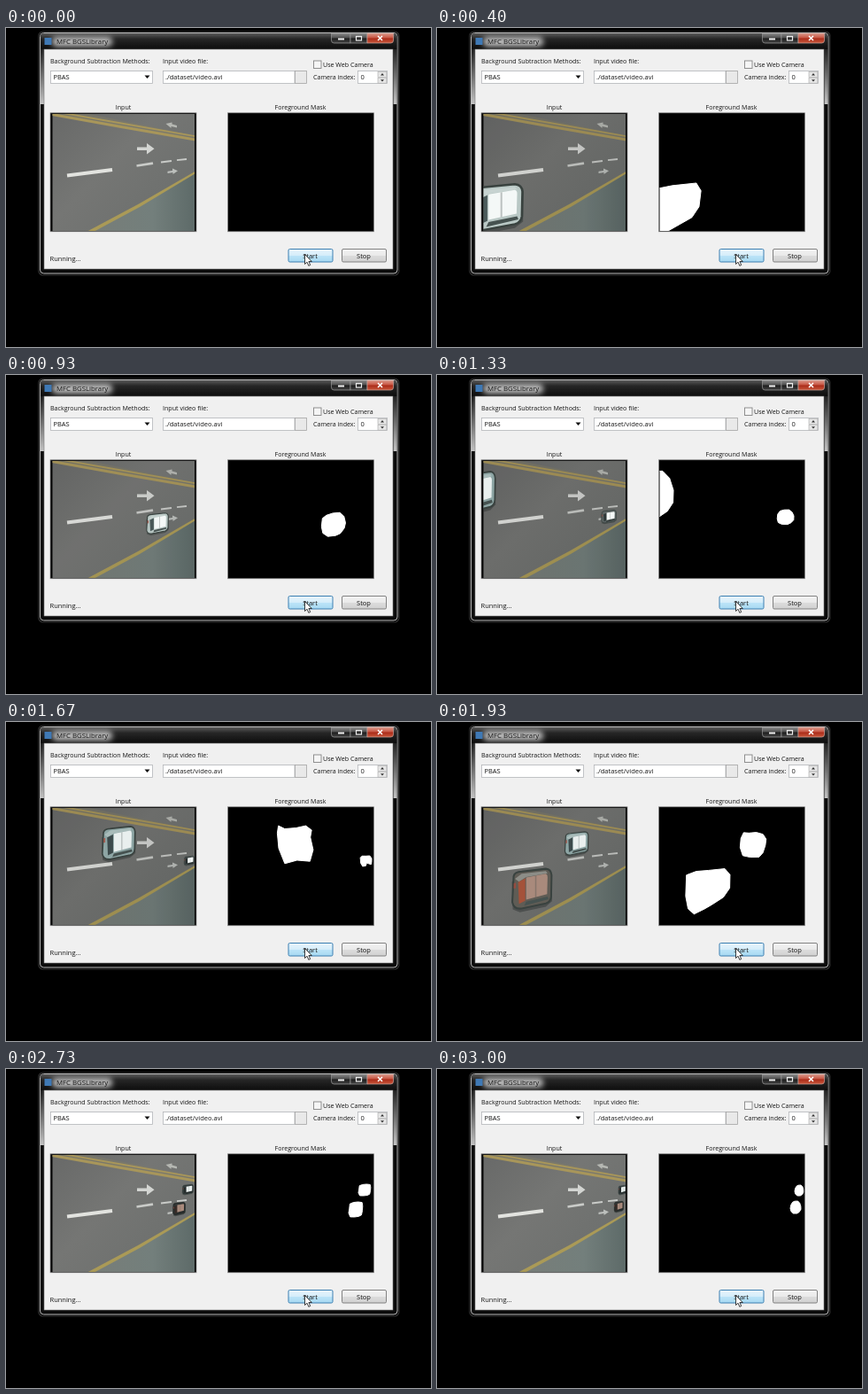
Animation of 480x360 px, one loop 3070 ms. Source, as an HTML page:

```html
<!DOCTYPE html>
<html lang="en">
<head>
<meta charset="utf-8">
<title>Background subtraction</title>
<style>
html, body { margin: 0; width: 100%; height: 100%; overflow: hidden; background: #000; }
svg { display: block; width: 480px; height: 360px; }
text { font: 7.1px "Open Sans", "Noto Sans", sans-serif; fill: #161616; }
.title { font-size: 7.8px; }
.value { font-size: 7.5px; }
.mid { text-anchor: middle; }
.field { fill: #fff; stroke: #b4b6ba; stroke-width: .8; }
.mask { fill: #fff; stroke: #fff; stroke-width: 1; stroke-linejoin: round; }
.paint { fill: none; stroke: #c9cbc8; }
.yellow { fill: none; stroke: #a8965a; }
</style>
</head>
<body>
<svg viewBox="0 0 480 360">
  <defs>
    <linearGradient id="bar" x2="0" y2="1">
      <stop offset="0" stop-color="#5a5a5a"/><stop offset=".35" stop-color="#262626"/><stop offset="1" stop-color="#0c0c0c"/>
    </linearGradient>
    <linearGradient id="edge" x2="0" y2="1">
      <stop offset="0" stop-color="#222"/><stop offset="1" stop-color="#c4c4c4"/>
    </linearGradient>
    <linearGradient id="red" x2="0" y2="1">
      <stop offset="0" stop-color="#dd9a8c"/><stop offset=".48" stop-color="#c65340"/><stop offset=".52" stop-color="#a92a18"/><stop offset="1" stop-color="#c8573b"/>
    </linearGradient>
    <linearGradient id="cap" x2="0" y2="1">
      <stop offset="0" stop-color="#8a8a8a"/><stop offset=".48" stop-color="#4d4d4d"/><stop offset=".52" stop-color="#1c1c1c"/><stop offset="1" stop-color="#444"/>
    </linearGradient>
    <linearGradient id="btn" x2="0" y2="1">
      <stop offset="0" stop-color="#f3f3f3"/><stop offset=".5" stop-color="#e9e9e9"/><stop offset=".52" stop-color="#dcdcdc"/><stop offset="1" stop-color="#d0d0d0"/>
    </linearGradient>
    <linearGradient id="hot" x2="0" y2="1">
      <stop offset="0" stop-color="#e8f5fc"/><stop offset=".5" stop-color="#d5edfa"/><stop offset=".52" stop-color="#bce4f8"/><stop offset="1" stop-color="#a6d8f1"/>
    </linearGradient>
    <linearGradient id="road" x2="1" y2=".8">
      <stop offset="0" stop-color="#686968"/><stop offset=".45" stop-color="#757674"/><stop offset="1" stop-color="#6b6e6c"/>
    </linearGradient>
    <linearGradient id="verge" x2="1" y2="0">
      <stop offset="0" stop-color="#787d78"/><stop offset=".6" stop-color="#737f7c"/><stop offset="1" stop-color="#5c6967"/>
    </linearGradient>
    <filter id="soft"><feGaussianBlur stdDeviation=".55"/></filter>
    <filter id="glow" x="-30%" y="-80%" width="160%" height="260%"><feGaussianBlur stdDeviation="3"/></filter>
    <clipPath id="left"><rect x="52.5" y="97" width="160.5" height="132"/></clipPath>
    <clipPath id="right"><rect x="251.5" y="97" width="163" height="132"/></clipPath>
  </defs>

  <rect width="480" height="360"/>

  <!-- window frame -->
  <rect x="38.5" y="5.5" width="403.5" height="271.5" rx="4" fill="#0b0b0b" stroke="#b9b9b9"/>
  <rect x="36.8" y="4" width="407" height="275" rx="5" fill="none" stroke="#333" stroke-width="1.2"/>
  <path d="M39 24V9q0-3 3-3H438.500q3 0 3 3V24Z" fill="url(#bar)"/>
  <rect x="39" y="24" width="4" height="62" fill="url(#edge)"/>
  <rect x="437.500" y="24" width="4" height="62" fill="url(#edge)"/>
  <rect x="52" y="10" width="68" height="11" rx="5" fill="#bdbdbd" filter="url(#glow)"/>
  <rect x="43.500" y="11" width="8" height="8" fill="#3f79b5"/>
  <text class="title" x="57" y="18.200">MFC BGSLibrary</text>

  <path d="M367.500 6H389V17H370.500q-3 0-3-3Z" fill="url(#cap)" stroke="#999" stroke-width=".7"/>
  <rect x="389" y="6" width="19" height="11" fill="url(#cap)" stroke="#999" stroke-width=".7"/>
  <path d="M408 6H437.500V14q0 3-3 3H408Z" fill="url(#red)" stroke="#c9a49c" stroke-width=".7"/>
  <rect x="375" y="11.500" width="7" height="2" fill="#eee"/>
  <rect x="395.500" y="9.500" width="6" height="4.500" fill="none" stroke="#eee" stroke-width="1.200"/>
  <path d="M420 9l5 5m0-5l-5 5" stroke="#fff" stroke-width="1.500"/>

  <rect x="43" y="24" width="394" height="248" fill="#f0f0f0" stroke="#777" stroke-width=".6"/>

  <!-- controls -->
  <text x="50" y="39.800">Background Subtraction Methods:</text>
  <rect class="field" x="50.500" y="48.500" width="115" height="14"/>
  <text class="value" x="53.500" y="58">PBAS</text>
  <path d="M156.500 53.500h6l-3 3.600Z" fill="#111"/>

  <text x="177" y="39.800">Input video file:</text>
  <rect class="field" x="177.500" y="48.500" width="148.500" height="14"/>
  <text class="value" x="180" y="58">./dataset/video.avi</text>
  <rect x="326.500" y="48.500" width="13" height="14" fill="#e9e9e9" stroke="#a5a5a5" stroke-width=".8"/>

  <rect x="347.500" y="37" width="8.500" height="8.500" fill="#f5f5f5" stroke="#858585" stroke-width=".9"/>
  <text x="358" y="43.800">Use Web Camera</text>
  <text x="347" y="58">Camera index:</text>
  <rect class="field" x="397.500" y="48.500" width="33" height="14"/>
  <text class="value" x="400.500" y="58">0</text>
  <rect x="420" y="49.300" width="9.800" height="6" fill="#e6e6e6" stroke="#aaa" stroke-width=".6"/>
  <rect x="420" y="56.200" width="9.800" height="6" fill="#e6e6e6" stroke="#aaa" stroke-width=".6"/>
  <path d="M423 53.500h4l-2-2.400ZM423 58.200h4l-2 2.400Z" fill="#333"/>

  <text class="mid" x="132.500" y="91.500">Input</text>
  <text class="mid" x="332.500" y="91.500">Foreground Mask</text>
  <rect x="50" y="95.800" width="165" height="134" fill="#050505" stroke="#8a8a8a" stroke-width=".7"/>
  <rect x="250.500" y="95.800" width="165" height="134" fill="#000" stroke="#8a8a8a" stroke-width=".7"/>

  <text class="value" x="49.500" y="263">Running...</text>

  <!-- street -->
  <g clip-path="url(#left)">
    <rect x="52" y="96" width="163" height="134" fill="url(#road)"/>
    <g filter="url(#soft)">
      <path d="M90 231L150 200L216 162V231Z" fill="url(#verge)"/>
      <path d="M52 95H84L216 122V127L130 111L52 97Z" fill="#807c69" opacity=".55"/>
      <path class="yellow" d="M52 97.500L130 111.500L216 126.500" stroke-width="3"/>
      <path class="yellow" d="M62 95.500L130 107.500L216 122.500" stroke-width="1.800"/>
      <path d="M89 231L150 198.500L215 161V163.500L151 202L97 231Z" fill="#aa9a57"/>
      <path class="paint" d="M69 166.500L120 160" stroke-width="4" style="stroke:#e2e3df"/>
      <path class="paint" d="M147.500 155.500L166 152.700" stroke-width="2.700"/>
      <path class="paint" d="M175 151.500L187 150M193 149.200L204 148" stroke-width="1.800"/>
      <path d="M148 134.600H159V130L167.500 136.300L159 142.500V138H148Z" fill="#d3d5d2"/>
      <path d="M182.500 161.800L188 161V158.500L194 161.300L188.500 165V163L182.500 164Z" fill="#bcbfbc"/>
      <path d="M193 112.500L186.500 111V113L180.500 108L187.500 106.500V108.500L193 110Z" fill="#b5b7b2"/>
    </g>
    <rect id="shade" x="52" y="96" width="163" height="134" opacity="0"/>
    <g id="cars" filter="url(#soft)"></g>
  </g>
  <g id="blobs" clip-path="url(#right)"></g>

  <!-- buttons and pointer -->
  <rect x="319" y="249.500" width="50" height="14.500" rx="1.500" fill="url(#hot)" stroke="#3c7fb1"/>
  <text class="value mid" x="343.500" y="259.600">Start</text>
  <rect x="379.500" y="249.500" width="50" height="14.500" rx="1.500" fill="url(#btn)" stroke="#777" stroke-width=".9"/>
  <text class="value mid" x="404" y="259.600">Stop</text>
  <path d="M337.500 255.500V266.500L340 264.200L341.800 268.300L343.700 267.500L341.900 263.500H345.300Z" fill="#fff" stroke="#111" stroke-width=".8"/>
</svg>

<script>
const LOOP = 3070, STEP = 200 / 3, SHIFT = 200, VANISH = 435;

// Twelve outline points each, in percent of the bounding box.
const SHAPES = {
  wide: [2,16, 24,9, 52,4, 90,0, 100,14, 98,45, 84,64, 62,78, 42,90, 18,100, 6,88, 1,60],
  tall: [4,28, 24,14, 50,6, 92,0, 100,22, 92,50, 94,72, 70,88, 40,94, 14,100, 2,80, 0,52],
  horn: [2,20, 6,0, 24,10, 55,6, 80,0, 96,10, 92,30, 100,62, 90,92, 55,92, 22,100, 6,60],
  oval: [6,30, 20,10, 42,2, 70,0, 90,16, 100,42, 98,66, 84,88, 62,100, 28,98, 6,84, 0,58],
  box: [10,12, 35,4, 65,0, 95,2, 100,25, 97,55, 92,85, 70,96, 40,100, 12,100, 0,75, 4,45],
  hook: [0,20, 15,2, 50,4, 85,0, 100,25, 100,55, 95,80, 72,72, 55,65, 48,95, 20,100, 4,70]
};

// Keys: time, left, top, right, bottom, outline.
const CARS = [
  { body: "#b9c8c5", glass: "#4a5a5a", roof: "#f4f8f7", keys: [
    [270, 158, 190, 248, 262, "wide"], [600, 290, 163, 339, 214, "wide"],
    [1330, 384, 152, 403, 169, "oval"], [1670, 400, 151, 413, 163, "hook"],
    [1870, 408, 150, 416, 159, "hook"]] },
  { body: "#8da5a4", glass: "#3c4a4b", roof: "#e9efee", keys: [
    [1200, 165, 100, 235, 165, "oval"], [1330, 225, 108, 267, 161, "oval"],
    [1670, 305, 117, 347, 160, "horn"], [2200, 363, 127, 386, 150, "oval"],
    [2730, 398, 130, 412, 143, "box"], [3000, 404, 131, 414, 143, "oval"]] },
  { body: "#5f5c55", glass: "#a4523a", roof: "#a98a7c", keys: [
    [1670, 158, 190, 248, 262, "wide"], [1960, 288, 163, 336, 214, "wide"],
    [2200, 326, 158, 360, 196, "tall"], [2730, 387, 150, 403, 167, "box"],
    [3000, 399, 149, 411, 163, "oval"]] }
];

const BODY = "M12 18Q14 9 30 8L84 2Q96 3 97 16L96 62Q95 74 84 77L30 88Q12 90 9 74Z";
const $ = id => document.getElementById(id);
const lerp = (a, b, u) => a + (b - a) * u;
const clamp = v => Math.max(0, Math.min(1, v));

function add(parent, tag, attrs) {
  const el = document.createElementNS("http://www.w3.org/2000/svg", tag);
  for (const name in attrs) el.setAttribute(name, attrs[name]);
  return parent.appendChild(el);
}

for (const car of CARS) {
  const g = car.group = add($("cars"), "g", {});
  const part = (d, fill, more) => add(g, "path", { d, fill, ...more });
  part("M8 30L98 18L98 72L84 84L26 96L10 90Z", "#2b302f", { opacity: .45 });
  part(BODY, car.body, { stroke: "#39423f", "stroke-width": 4 });
  part("M15 24L30 13L84 7L88 12L40 20L24 30Z", "#dfe8e6", { opacity: .35 });
  part("M22 31L38 23L38 71L24 78Z", car.glass);
  part("M40 73L88 62L90 68L36 82Z", "#465250");
  car.dim = part(BODY, "#1d2222");
  part("M40 21L84 13Q88 14 88 20L87 57L40 69Z", car.roof);
  part("M60 18L63 17L63 63L60 64Z", "#3b4544", { opacity: .3 });
  part("M12 34L17 32L17 44L12 45Z", "#a34a3c", { opacity: .8 });
  car.blob = add($("blobs"), "polygon", { class: "mask" });
}

// Constant speed along the road: the inverse distance to the vanishing point grows evenly.
function pose(keys, t) {
  if (t < keys[0][0] || t > keys.at(-1)[0]) return null;
  let i = 0;
  while (i < keys.length - 2 && t >= keys[i + 1][0]) i++;
  const a = keys[i], b = keys[i + 1], s = (t - a[0]) / (b[0] - a[0]);
  const far = k => VANISH - (k[1] + k[3]) / 2;
  const d = 1 / lerp(1 / far(a), 1 / far(b), s);
  const u = (far(a) - d) / (far(a) - far(b));
  const [x, y, r, q] = [1, 2, 3, 4].map(n => lerp(a[n], b[n], u));
  const from = SHAPES[a[5]], to = SHAPES[b[5]];
  return { x, y, w: r - x, h: q - y, outline: from.map((v, n) => lerp(v, to[n], u)) };
}

function rough(n, k) {
  const v = Math.sin(n * 12.99 + k * 78.23) * 43758.5;
  return (v - Math.floor(v) - .5) * 4;
}

function draw(k) {
  const t = Math.round(k * STEP / 10) * 10;
  let shade = 0;
  for (const car of CARS) {
    const p = pose(car.keys, t);
    const show = p ? "inline" : "none";
    car.group.style.display = car.blob.style.display = show;
    if (!p) continue;
    car.group.setAttribute("transform",
      `matrix(${p.w / 100} 0 0 ${p.h / 100} ${p.x - SHIFT} ${p.y})`);
    car.dim.setAttribute("opacity", clamp((28 - p.w) / 12) * .8);
    car.blob.setAttribute("points", p.outline.map((v, n) => {
      const f = clamp((v + rough(n, k)) / 100);
      return (n % 2 ? p.y + f * p.h : p.x + f * p.w).toFixed(2);
    }).join(" "));
    if (p.x + p.w > 252) shade = Math.max(shade, clamp((p.w - 16) / 20) * .08);
  }
  $("shade").setAttribute("opacity", shade);
}

const begin = performance.now();
let last = -1;
function tick() {
  const t = (performance.now() - begin) % LOOP;
  let k = Math.floor(t / STEP) + 1;
  if (Math.round(k * STEP / 10) * 10 > t) k--;
  if (k !== last) draw(last = k);
  requestAnimationFrame(tick);
}
tick();
</script>
</body>
</html>
```
